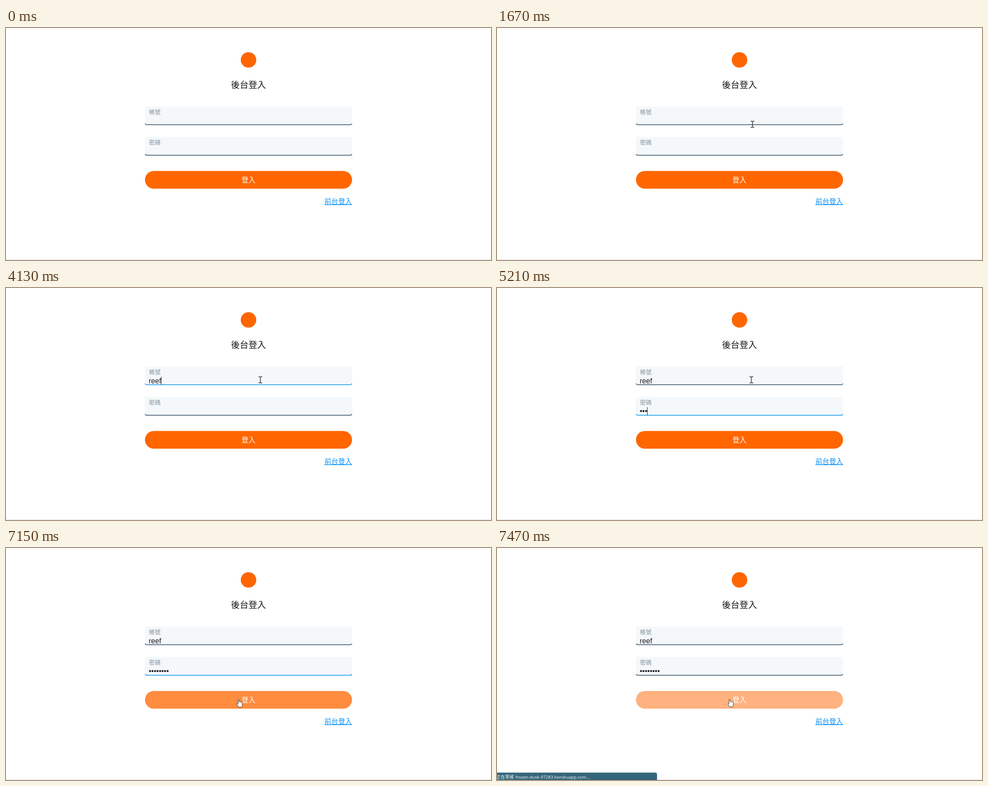
An HTML page that plays this animation: 1082 px wide and 518 px high, repeating every 8 s.

```html
<!DOCTYPE html>
<html lang="zh-Hant">
<head>
<meta charset="utf-8">
<title>後台登入</title>
<style>
html, body { margin: 0; width: 100%; height: 100%; overflow: hidden; background: #fff; }
svg { position: absolute; left: 0; top: 0; }
text { font-family: "Noto Sans CJK TC", "Noto Sans CJK", sans-serif; }
.label { font-size: 12.9px; font-weight: 300; fill: #84929c; }
.line { fill: none; stroke: #4b6274; stroke-width: 1.6; }
.field { fill: #f4f8fb; }

/* every animation shares one 8 s clock */
.line1, .line2, .button, .tip, .status { animation: 8s linear infinite; }
.typed, .caret, .cursor, .arrow, .beam, .hand { animation: 8s step-end infinite; }
.line1 { animation-name: line1; }
.line2 { animation-name: line2; }
.button { animation-name: button; }
.tip { animation-name: tip; }
.status { animation-name: status; }
.user { animation-name: user; }
.pass { animation-name: pass; }
.caret { animation-name: caret; }
.cursor { animation-name: cursor; }
.arrow { animation-name: arrow; }
.beam { animation-name: beam; }
.hand { animation-name: hand; }

.typed {
  position: absolute; left: 318.5px; overflow: hidden; white-space: nowrap;
  font: 16px/18px "Liberation Sans", Arial, sans-serif; color: #1b1b24;
}
.user { top: 198.5px; }
.pass { top: 266px; }
.caret { position: absolute; width: 1.5px; background: #1b1b24; }

@keyframes line1 {
  0%, 23.2% { stroke: #4b6274; }
  25.8%, 55.99% { stroke: #2ba4ef; }
  56%, 100% { stroke: #4b6274; }
}
@keyframes line2 {
  0%, 55.99% { stroke: #4b6274; }
  56%, 90.2% { stroke: #2ba4ef; }
  92.3%, 100% { stroke: #4b6274; }
}
@keyframes button {
  0%, 86.5% { opacity: 1; }
  88.5%, 90% { opacity: .75; }
  92.3%, 100% { opacity: .5; }
}
@keyframes tip {
  0%, 6.2% { opacity: 0; }
  8.1%, 14.11% { opacity: 1; }
  14.114%, 100% { opacity: 0; }
}
@keyframes status {
  0%, 93.37% { opacity: 0; }
  93.375%, 100% { opacity: 1; }
}
@keyframes user {
  0% { width: 0; }
  44.125% { width: 5.4px; }
  47.5% { width: 14.3px; }
  49.125% { width: 23.2px; }
  51.625%, 100% { width: 30px; }
}
@keyframes pass {
  0% { width: 0; }
  61% { width: 5.6px; }
  62.625% { width: 11.2px; }
  65.125% { width: 16.8px; }
  68.5% { width: 22.4px; }
  70.125% { width: 28px; }
  71.75% { width: 33.6px; }
  75.875% { width: 39.2px; }
  77.5%, 100% { width: 46px; }
}
@keyframes caret {
  0% { left: 318.5px; top: 197px; height: 20px; opacity: 0; }
  23.5% { left: 318.5px; top: 197px; height: 20px; opacity: 1; }
  29.25% { left: 318.5px; top: 197px; height: 20px; opacity: 0; }
  35.875% { left: 318.5px; top: 197px; height: 20px; opacity: 1; }
  42.5% { left: 318.5px; top: 197px; height: 20px; opacity: 0; }
  44.125% { left: 323.6px; top: 198px; height: 18px; opacity: 1; }
  47.5% { left: 332.5px; top: 198px; height: 18px; opacity: 1; }
  49.125% { left: 341.4px; top: 198px; height: 18px; opacity: 1; }
  51.625% { left: 345.8px; top: 198px; height: 18px; opacity: 1; }
  56% { left: 318.5px; top: 265px; height: 20px; opacity: 1; }
  61% { left: 324px; top: 266px; height: 18px; opacity: 1; }
  62.625% { left: 329.6px; top: 266px; height: 18px; opacity: 1; }
  65.125% { left: 335.2px; top: 266px; height: 18px; opacity: 1; }
  68.5% { left: 340.8px; top: 266px; height: 18px; opacity: 1; }
  70.125% { left: 346.4px; top: 266px; height: 18px; opacity: 1; }
  71.75% { left: 352px; top: 266px; height: 18px; opacity: 1; }
  75.875% { left: 357.8px; top: 266px; height: 18px; opacity: 1; }
  77.5% { left: 363.4px; top: 266px; height: 18px; opacity: 1; }
  84.125%, 100% { left: 363.4px; top: 266px; height: 18px; opacity: 0; }
}
@keyframes cursor {
  0%, 13.25% { transform: translate(1040px, 508px); }
  14.114% { transform: translate(1000px, 470px); }
  14.977% { transform: translate(920px, 400px); }
  15.841% { transform: translate(830px, 335px); }
  16.704% { transform: translate(750px, 296px); }
  17.568% { transform: translate(690px, 275px); }
  18.432% { transform: translate(640px, 258px); }
  19.295% { transform: translate(598px, 243px); }
  20.159% { transform: translate(570px, 215px); }
  21.022% { transform: translate(556px, 205px); }
  21.886% { transform: translate(562px, 204px); }
  22.75% { transform: translate(567.5px, 205px); }
  82.5% { transform: translate(570.5px, 205.5px); }
  84.125% { transform: translate(569px, 212px); }
  85% { transform: translate(550px, 252px); }
  85.875% { transform: translate(530px, 282px); }
  86.75% { transform: translate(523px, 325px); }
  87.625% { transform: translate(520px, 340px); }
  88.5% { transform: translate(519px, 338px); }
  93.375%, 100% { transform: translate(519px, 337.3px); }
}
@keyframes arrow {
  0% { opacity: 0; }
  13.25% { opacity: 1; }
  17.568%, 100% { opacity: 0; }
}
@keyframes beam {
  0% { opacity: 0; }
  17.568% { opacity: 1; }
  86.75%, 100% { opacity: 0; }
}
@keyframes hand {
  0% { opacity: 0; }
  86.75%, 100% { opacity: 1; }
}
</style>
</head>
<body>
<svg width="1082" height="518" viewBox="0 0 1082 518">
  <circle cx="541" cy="71.3" r="17.3" fill="#ff6600"/>
  <text x="541" y="133.5" text-anchor="middle" font-size="19.5" font-weight="500" fill="#17171c">後台登入</text>

  <rect class="field" x="310" y="175.5" width="462" height="41" rx="4"/>
  <path class="line line1" d="M310.3 213.2q1 2.7 4 2.7H767.7q3 0 4-2.7"/>
  <text class="label" x="319" y="192">帳號</text>

  <rect class="field" x="310" y="243" width="462" height="42" rx="4"/>
  <path class="line line2" d="M310.3 281.4q1 2.7 4 2.7H767.7q3 0 4-2.7"/>
  <text class="label" x="319" y="260">密碼</text>

  <g class="button">
    <rect x="310" y="319.3" width="462" height="39.4" rx="19.7" fill="#ff6600"/>
    <text x="541" y="344.8" text-anchor="middle" font-size="15.4" font-weight="300" fill="#fff">登入</text>
  </g>
  <text x="772" y="392.7" text-anchor="end" font-size="15.4" fill="#0a91f5" text-decoration="underline">前台登入</text>

  <rect y="517" width="1082" height="1" fill="#dcdcdc"/>
  <g class="tip">
    <rect x="1056.7" y="506.7" width="40" height="24" fill="#fff" stroke="#999" stroke-width="1.4"/>
    <text x="1061" y="521.5" font-size="10.4" fill="#666">停止</text>
  </g>
  <g class="status">
    <path d="M0 501.6H353q4 0 4 4V518H0z" fill="#35657a"/>
    <text x="-1.5" y="514.7" font-size="9.8" fill="#fff">正在等候</text>
    <text x="41" y="514.7" font-size="9.7" fill="#fff" style="font-family:'Open Sans','Noto Sans',sans-serif">frozen-dusk-97283.herokuapp.com...</text>
  </g>
</svg>

<div class="typed user">reef</div>
<div class="typed pass">••••••••</div>
<div class="caret"></div>

<svg width="1082" height="518" viewBox="0 0 1082 518">
  <g class="cursor">
    <path class="arrow" d="M0 0V16L3.7 12.6L6.2 18.2L8.6 17.1L6.2 11.7H11.3z" fill="#fff" stroke="#222" stroke-width="1"/>
    <path class="beam" d="M-4 -6.8H-1.2L0 -6L1.2 -6.8H4M0 -6V6M-4 6.8H-1.2L0 6L1.2 6.8H4" fill="none" stroke="#222" stroke-width="1.4"/>
    <path class="hand" d="M-1.2 1Q0 -1 1.2 1V5.6Q2.6 4.6 3.7 6Q5 5.2 6 6.7Q7.8 6.2 8.2 8V12Q8 15 6.6 17.3H-.2Q-1 15 -3.2 12.2Q-4.6 10 -3.4 9.3Q-2.2 8.9 -1.2 10.4z" fill="#fff" stroke="#333" stroke-width="1" stroke-linejoin="round"/>
  </g>
</svg>
</body>
</html>
```
